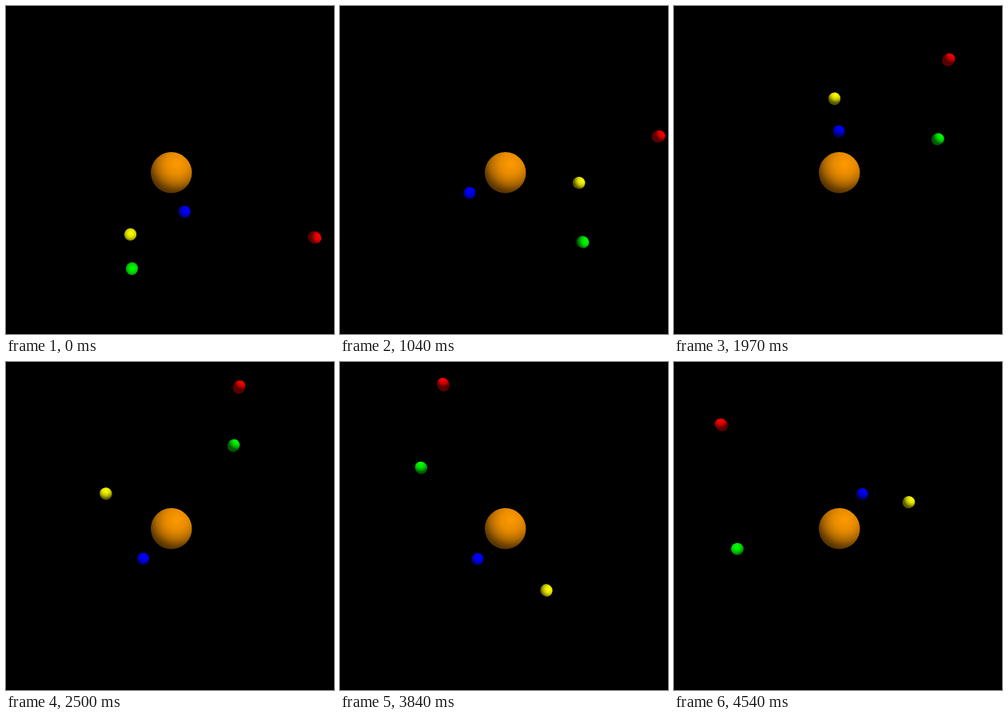
Animation, 410 px wide and 411 px high, one loop 4.64 s. Source, as an HTML page with a canvas:

```html
<!DOCTYPE html>
<html lang="en">
<head>
<meta charset="utf-8">
<title>Orbits</title>
<style>
  html, body { margin: 0; width: 100%; height: 100%; overflow: hidden; background: #000; }
  canvas { display: block; }
</style>
</head>
<body>
<canvas id="stage" width="410" height="411"></canvas>
<script>
const ctx = document.getElementById('stage').getContext('2d');
const LOOP = 4640;
const CENTER = { x: 206.7, y: 208.8 };
const AMBIENT = 0.35;

// Degrees, counterclockwise from the right; drift is a slow lead or lag over the loop.
const planets = [
  { color: [0, 0, 255],   orbit: 51.6,  start: -71.5, sweep: 1208.2, drift: 1.3 },
  { color: [255, 255, 0], orbit: 92.8,  start: 236.5, sweep: 504.4,  drift: -1.3 },
  { color: [0, 255, 0],   orbit: 130,   start: 247.7, sweep: 303.6,  drift: 0 },
  { color: [255, 0, 0],   orbit: 196.6, start: -24.4, sweep: 163,    drift: 0 }
];

// Uneven stepping: [time in ms, steps so far, share of the sweep].
const pace = [
  [0, 0, 0], [660, 13, 0.1448], [1420, 27, 0.3186], [2500, 45, 0.5452],
  [3160, 57, 0.6955], [3840, 70, 0.8445], [4540, 83, 1]
];

function progress(time) {
  const i = pace.findIndex(([t]) => t > time);
  if (i < 0) return 1;
  const [t0, n0, p0] = pace[i - 1];
  const [t1, n1, p1] = pace[i];
  const steps = n1 - n0;
  const step = Math.floor((time - t0) / (t1 - t0) * steps + 1e-6);
  return p0 + (p1 - p0) * step / steps;
}

function shade(color, light) {
  return `rgb(${color.map(c => Math.round(c * light)).join()})`;
}

// Perspective stretches a sphere outward and moves its highlight the same way.
function sphere(dx, dy, radius, color) {
  const x = CENTER.x + dx, y = CENTER.y + dy;
  const far = Math.hypot(dx, dy) / 196;
  const lightX = x + radius * (dx / 330 + 0.26);
  const lightY = y + radius * (dy / 330 - 0.43);
  const fill = ctx.createRadialGradient(lightX, lightY, 0, lightX, lightY, radius * 1.4);
  [[0, 1], [0.36, 0.87], [0.54, 0.71], [0.71, 0.5], [0.89, 0.17], [1, 0]]
    .forEach(([stop, direct]) =>
      fill.addColorStop(stop, shade(color, AMBIENT + (1 - AMBIENT) * direct)));
  ctx.fillStyle = fill;
  ctx.beginPath();
  ctx.ellipse(x, y, radius * (1 + 0.14 * far * far), radius, Math.atan2(dy, dx), 0, Math.PI * 2);
  ctx.fill();
}

function draw(time) {
  ctx.fillStyle = '#000';
  ctx.fillRect(0, 0, 410, 411);
  sphere(0, 0, 25.7, [255, 153, 0]);
  const done = progress(time);
  for (const { color, orbit, start, sweep, drift } of planets) {
    const degrees = start + sweep * done + drift * Math.sin(done * Math.PI * 2);
    const angle = degrees * Math.PI / 180;
    sphere(orbit * Math.cos(angle), -orbit * Math.sin(angle), 7.6, color);
  }
}

const began = performance.now();
function tick() {
  draw((performance.now() - began) % LOOP);
  requestAnimationFrame(tick);
}
tick();
</script>
</body>
</html>
```
